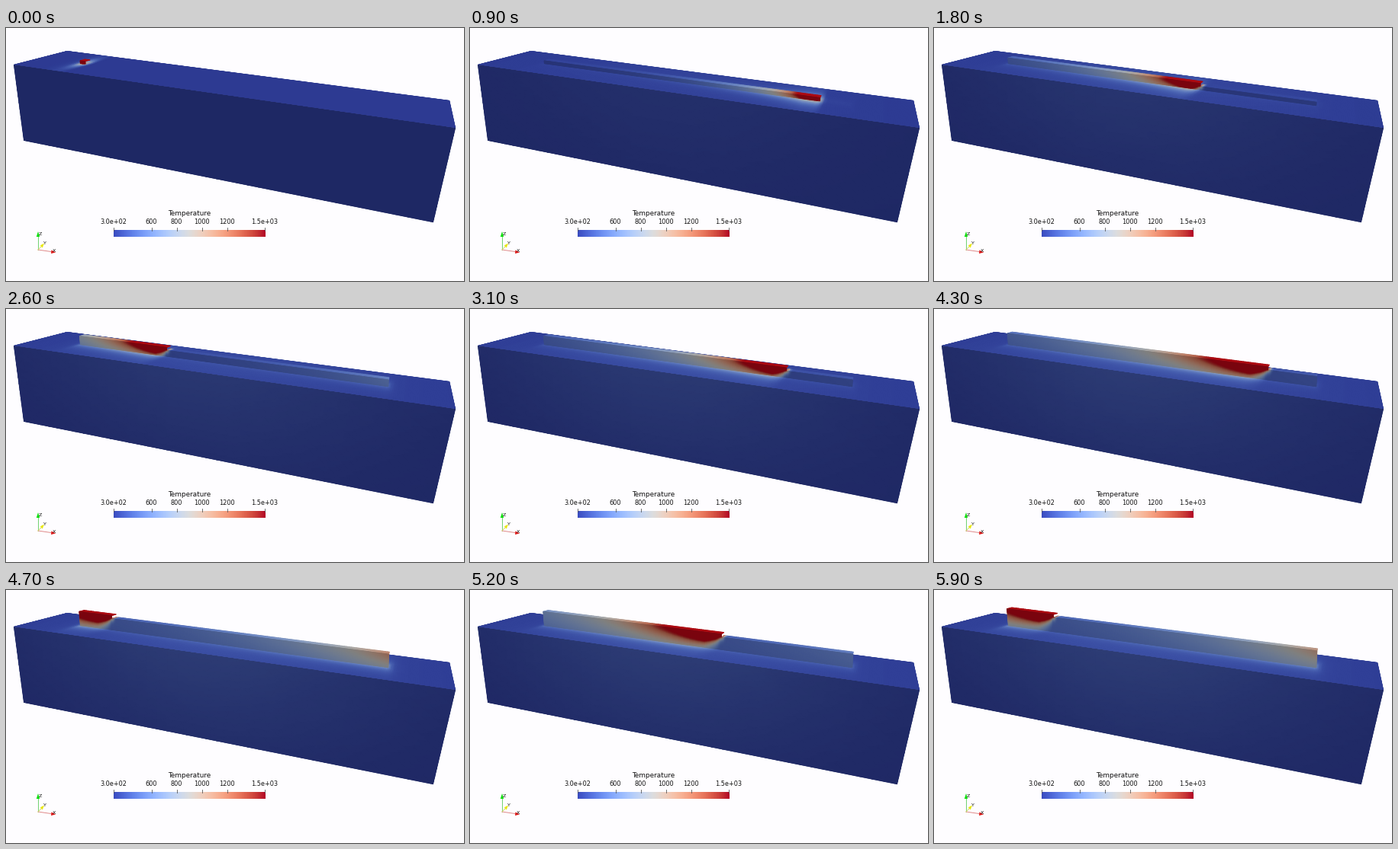
These frames come from a looping animation (600 by 332 pixels, 6 s). A matplotlib script:

```python
import numpy as np
import matplotlib
import matplotlib.pyplot as plt
from matplotlib.animation import FuncAnimation
from matplotlib.colors import LinearSegmentedColormap

W, H, DPI = 600, 332, 100
FRAMES, STEP = 60, 100

# Deposition schedule: layer period and scan speed (wall lengths per second)
PERIOD, SPEED, LEAD = 1.149, 0.99, 0.02
POOL = [25, 40, 46, 60, 62, 64]          # melt pool length per layer, px
WALL_S0, WALL_LEN = 0.122, 0.751         # wall extent along the block
FRONT_Y, BACK_Y = 0.45, 0.55             # wall extent across the block
LAYER_PX = 3.8

base_map = matplotlib.colormaps["coolwarm"]


def shaded(factor, hot):
    """Diverging map darkened by the light, saturating to a deep red."""
    x = np.linspace(0, 1, 256)
    rgb = base_map(x)[:, :3] * factor
    mix = np.clip((x - 0.82) / 0.18, 0, 1)[:, None]
    rgb = rgb * (1 - mix) + np.array(hot) / 255 * mix
    return LinearSegmentedColormap.from_list("shaded", rgb, N=256)


SIDE = shaded(0.52, (118, 4, 14))
WALL = shaded(0.58, (122, 4, 14))
TOP = shaded(0.76, (172, 10, 18))


def project(s, y, z=0.0):
    """Block coordinates to screen pixels; z counts layers above the top."""
    w = 1 - 0.2254 * s + 0.1521 * y
    px = (10 + 446.2 * s + 82.17 * y) / w
    py = (48 + 53.47 * s - 13.44 * y) / w
    return px + (0.7 * s - 0.4) * z, py - LAYER_PX / w * z


def layer_start(j):
    return PERIOD * j - LEAD


def warmth(t):
    return 0.1 * (1 - np.exp(-t / 2))


def heat(u, z, t, layer):
    """Normalised temperature on the wall at length u and height z."""
    total = 0.6 * warmth(t)
    for j in range(layer + 1):
        pool = POOL[j]
        d = 400 * (t - layer_start(j) - u / SPEED)
        behind = np.maximum(d, 1)
        depth = np.maximum(j + 1 - z, 0) * 4
        f = np.sqrt(pool / behind) * np.exp((pool - behind) / (4 * pool))
        spread = 2.7 * np.sqrt(behind + 1)
        f = np.minimum(f, 2) * np.exp(-(depth / spread) ** 1.3)
        total = total + f * np.exp(-(np.minimum(d, 0) / 3) ** 2)
    return total


fig = plt.figure(figsize=(W / DPI, H / DPI), dpi=DPI, facecolor="#fefdff")
ax = fig.add_axes([0, 0, 1, 1])
ax.set_xlim(0, W)
ax.set_ylim(H, 0)
ax.axis("off")
ax.set_autoscale_on(False)


def poly(points, color, z=1):
    return ax.fill(*zip(*points), color=color, lw=0, zorder=z)[0]


def label(x, y, text, px):
    ax.text(x, y, text, fontsize=px * 72 / DPI, family="DejaVu Sans",
            color="#111111", ha="center", va="center", zorder=9)


def line(x0, y0, x1, y1, color, lw=0.7):
    ax.plot([x0, x1], [y0, y1], color=color, lw=lw, zorder=8)


# Block silhouette
A, B, C, D, E, F = (10, 48), (589, 131), (80, 30), (581.2, 95), (23.3, 147.7), (559.6, 255.2)
side_face = poly([A, B, F, E], SIDE(0.0))
top_face = poly([A, B, D, C], TOP(0.0))

# Colour bar
ax.imshow(np.linspace(0, 1, 256)[None, :], cmap=base_map, aspect="auto",
          extent=(141, 339.5, 274, 265), zorder=5)
ax.set_xlim(0, W)
ax.set_ylim(H, 0)
label(240, 243.5, "Temperature", 8.9)
for tick, text in [(300, "3.0e+02"), (600, "600"), (800, "800"),
                   (1000, "1000"), (1200, "1200"), (1500, "1.5e+03")]:
    x = 141 + 198 * (tick - 300) / 1200
    label(x, 254.3, text, 8.2)
    line(x, 262, x, 266, "#555555", 0.6)

# Orientation axes
line(42, 291, 42, 273, "#70d070")
line(42, 291, 59, 293.5, "#e08888")
line(42, 291, 47, 286, "#d8d870")
poly([(42, 267), (39.8, 274), (44.2, 274)], "#10e010", 8)
poly([(65, 294.5), (59.5, 291.4), (59, 296)], "#e01818", 8)
poly([(50, 282.5), (44.8, 285.3), (47.8, 288.5)], "#e8e810", 8)
label(45.3, 270.5, "Z", 6.5)
label(62.8, 292, "X", 6.5)
label(49.5, 283, "Y", 6.5)

live = []


def mesh(x, y, values, cmap, z, clip=None):
    quads = ax.pcolormesh(x, y, np.clip(values, 0, 1), cmap=cmap, vmin=0,
                          vmax=1, shading="gouraud", zorder=z)
    if clip is not None:
        quads.set_clip_path(clip)
    live.append(quads)


def wall_front(u1, z0, z1, t, layer):
    u, z = np.meshgrid(np.linspace(0, u1, max(3, int(200 * u1))),
                       np.linspace(z0, z1, 4 * (z1 - z0) + 1))
    x, y = project(WALL_S0 + WALL_LEN * u, FRONT_Y, z)
    mesh(x, y, heat(u, z, t, layer), WALL, 4)


def wall_top(u0, u1, z, t, layer):
    u, v = np.meshgrid(np.linspace(u0, u1, max(3, int(200 * (u1 - u0)))),
                       [FRONT_Y, BACK_Y])
    x, y = project(WALL_S0 + WALL_LEN * u, v, z)
    mesh(x, y, heat(u, z, t, layer), TOP, 3)


top_s, top_y = np.meshgrid(np.linspace(0, 1, 141), np.linspace(0, 1, 41))
top_px = project(top_s, top_y)
side_a, side_b = np.meshgrid(np.linspace(0, 1, 41), np.linspace(0, 1, 13))


def draw_side(t):
    w = 1.24 * (1 - side_a) + side_a

    def edge(p, q, i):
        return (1.24 * (1 - side_a) * p[i] + side_a * q[i]) / w

    x, y = [edge(A, B, i) * (1 - side_b) + edge(E, F, i) * side_b for i in (0, 1)]
    spread = np.exp(-((side_a - 0.48) / 0.42) ** 2) * (1 - 0.65 * side_b)
    mesh(x, y, warmth(t) * spread, SIDE, 2, side_face)


def draw_top(t, layer):
    u = (top_s - WALL_S0) / WALL_LEN
    inside = np.clip(u, 0, 1)
    across = np.maximum(np.maximum(FRONT_Y - top_y, top_y - BACK_Y), 0)
    dist = np.hypot(across, 16 * (u - inside))
    source = np.minimum(heat(inside, 0, t, layer), 1)
    glow = source * (0.5 * np.exp(-dist / 0.11) + 0.09 * np.exp(-dist / 0.35))
    ambient = 0.6 * warmth(t) * np.exp(-((top_s - 0.48) / 0.45) ** 2)
    mesh(*top_px, glow + ambient, TOP, 2, top_face)


def update(i):
    while live:
        live.pop().remove()
    t = i * STEP / 1000
    layer = int((t + LEAD) // PERIOD)
    head = min((t - layer_start(layer)) * SPEED, 1)
    draw_side(t)
    draw_top(t, layer)
    if layer:
        if head < 1:
            wall_top(head, 1, layer, t, layer)
        wall_front(1, 0, layer, t, layer)
    wall_top(0, head, layer + 1, t, layer)
    wall_front(head, layer, layer + 1, t, layer)
    return live


anim = FuncAnimation(fig, update, frames=FRAMES, interval=STEP,
                     init_func=lambda: live, repeat=True, repeat_delay=0)
plt.show()
```
